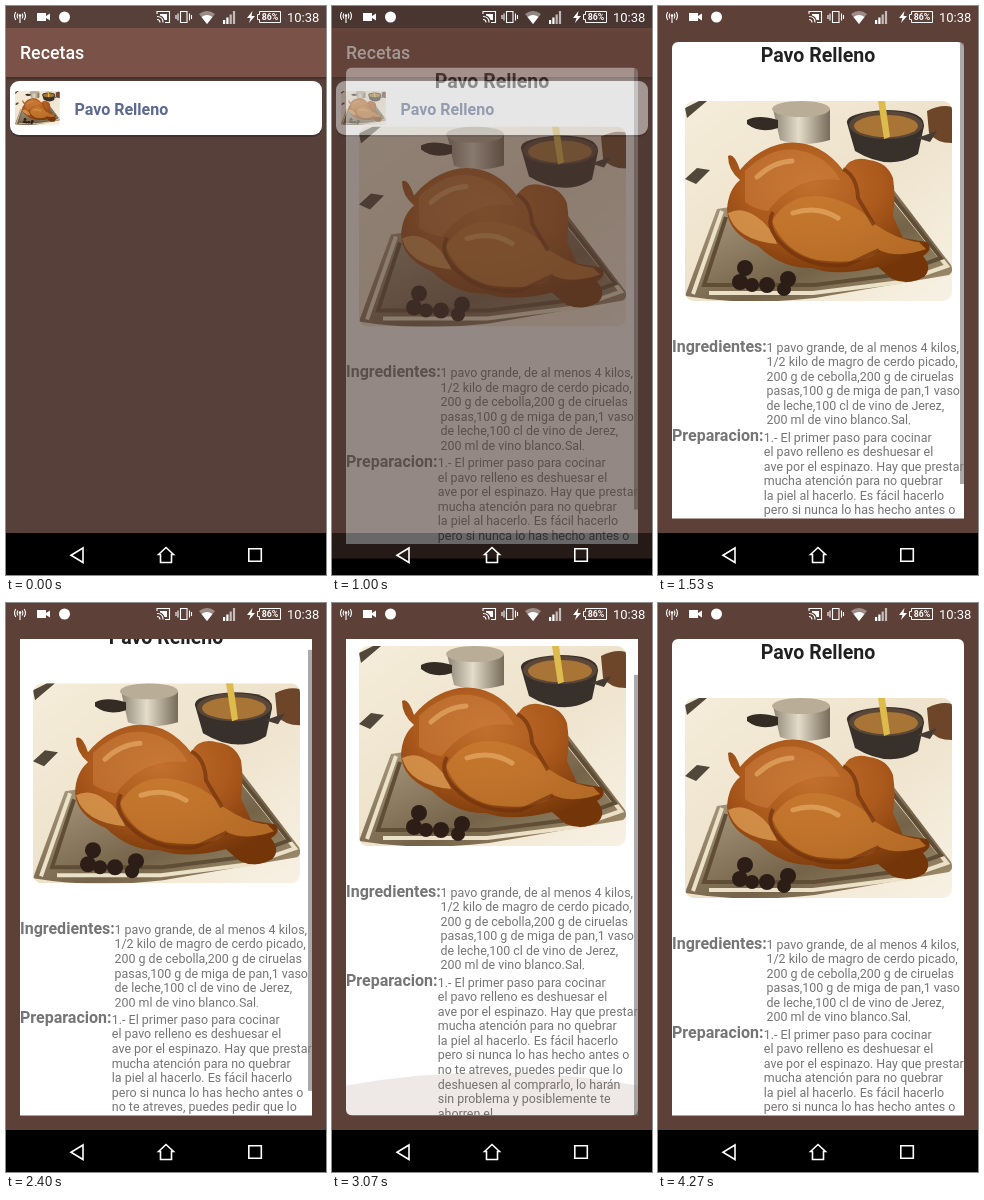
Animation, 320 px wide and 569 px high, one loop 4390 ms. Source, as an HTML page:

```html
<!DOCTYPE html>
<html lang="es">
<head>
<meta charset="utf-8">
<title>Recetas</title>
<style>
html, body { margin: 0; width: 100%; height: 100%; overflow: hidden; background: #000; }
svg { display: block; font-family: Roboto, sans-serif; }
#stage { width: 100vw; height: 100vh; }
.bold { font-weight: 700; font-size: 16px; }
.body { font-size: 12.44px; }
.line { fill: none; stroke: #fff; stroke-width: 1.6; }
</style>
</head>
<body>
<svg id="stage" viewBox="0 0 320 569">
  <defs>
    <linearGradient id="table" x2="1" y2="1">
      <stop offset="0" stop-color="#f5edda"/><stop offset=".5" stop-color="#eee2cb"/><stop offset="1" stop-color="#f8f1e4"/>
    </linearGradient>
    <linearGradient id="steel" x2="1">
      <stop offset="0" stop-color="#8f8676"/><stop offset=".45" stop-color="#e4dcc9"/><stop offset="1" stop-color="#776b59"/>
    </linearGradient>
    <linearGradient id="tray" x2="1" y2="1">
      <stop offset="0" stop-color="#b5a68c"/><stop offset=".6" stop-color="#756349"/><stop offset="1" stop-color="#a89675"/>
    </linearGradient>
    <radialGradient id="roast" cx=".42" cy=".3" r=".7">
      <stop offset="0" stop-color="#c2702c"/><stop offset=".5" stop-color="#ab591c"/><stop offset="1" stop-color="#743609"/>
    </radialGradient>
    <linearGradient id="shade" x2="0" y2="1">
      <stop offset="0" stop-opacity=".3"/><stop offset="1" stop-opacity="0"/>
    </linearGradient>
    <clipPath id="ingredientBox"><rect x="100" y="330" width="210" height="88.5"/></clipPath>
    <clipPath id="photoShape"><rect width="267" height="200" rx="9"/></clipPath>

    <g id="photo" clip-path="url(#photoShape)">
      <rect width="267" height="200" fill="url(#table)"/>
      <path d="M0 7l14-7h8L2 17zM0 78l12-11 13 2-14 14z" fill="#51483b"/>
      <path d="M88 8h57v31q-28 8-50 0z" fill="url(#steel)"/>
      <ellipse cx="116" cy="8" rx="29" ry="8" fill="#b9ad98"/>
      <path d="M62 19q11-6 31 0v8q-18 6-31-4z" fill="#352b25"/>
      <path d="M162 22q-2-10 38-13 40 0 39 16l-6 28q-28 18-63-3z" fill="#38302a"/>
      <ellipse cx="201" cy="24" rx="37" ry="14" fill="#5a4738"/>
      <ellipse cx="201" cy="25" rx="32" ry="11" fill="#a87536"/>
      <path d="M193 0h7l5 36-6 2z" fill="#ddbb4d"/>
      <path d="M242 10q14-7 25-4v36q-16 0-23-10z" fill="#6d4528"/>
      <path d="M232 37l20-7-7 11z" fill="#463c35"/>
      <path d="M32 108L0 195q60 10 130 2l134-23q5-3 2-10L208 88l-14-5z" fill="url(#tray)"/>
      <path d="M37 110L8 193M200 87l62 78-46 16-88 11H24" fill="none" stroke="#ebe1c9" stroke-width="4"/>
      <path d="M41 116l-22 68h110l80-10 47-17-51-65" fill="none" stroke="#5f4d36" stroke-width="4"/>
      <path d="M43 55q6-4 12 14 18-22 45-27 34-4 58 27 8-15 26-10 18 2 24 18 3 20 0 38l10 22 24 4q7 7-4 14 10 12 1 21-16 9-32 2l-14-12q-42 10-66 1-30 1-54-22-30-13-31-36 1-20 13-30-12-10-12-24z" fill="url(#roast)"/>
      <path d="M60 70q28-27 57-20 26 6 38 29-44-6-72 31-12-1-23-9z" fill="#cf8240" opacity=".5"/>
      <path d="M87 120q18-30 54-24 31 6 50 28 24 16 43 17l7 7q-28 10-47 1-13 16-62 10-33-8-45-39z" fill="#c97c31" opacity=".75"/>
      <path d="M43 112q14-7 29 4 15 10 20 27-42-4-49-31z" fill="#dc9c52" opacity=".8"/>
      <path d="M158 68q14 7 15 29l16 27M88 111q-8 14 7 30 25 27 67 23l32-15" fill="none" stroke="#6e300b" stroke-width="4" opacity=".65"/>
      <path d="M108 112q24-8 45 5M72 76q16-15 35-16" fill="none" stroke="#efbb76" stroke-width="5" stroke-linecap="round" opacity=".55"/>
      <g fill="#2c1e17">
        <circle cx="60" cy="167" r="8"/><circle cx="55" cy="181" r="8"/><circle cx="67" cy="184" r="7"/>
        <circle cx="82" cy="184" r="8"/><circle cx="103" cy="178" r="8"/><circle cx="99" cy="188" r="7"/>
      </g>
    </g>
  </defs>

  <rect width="320" height="569"/>
  <g id="list">
    <rect width="320" height="527" fill="#58403a"/>
    <rect y="22" width="320" height="49" fill="#7a5247"/>
    <rect y="71" width="320" height="4" fill="url(#shade)"/>
    <text x="14" y="53" font-size="17.78" font-weight="500" fill="#fff">Recetas</text>
    <rect x="4" y="77" width="312" height="54" rx="9" opacity=".25"/>
    <rect x="4" y="75" width="312" height="54" rx="9" fill="#fff"/>
    <use href="#photo" transform="translate(9 85) scale(.168 .17)"/>
    <text x="68.5" y="108.5" class="bold" fill="#5c698f">Pavo Relleno</text>
    <rect id="dim" width="320" height="569"/>
  </g>

  <g id="detail">
    <rect width="320" height="527" fill="#5d4038"/>
    <svg x="14" y="36" width="292" height="476.5" viewBox="14 36 292 476.5">
      <g id="content">
        <rect x="14" y="36" width="292" height="528.5" rx="6" fill="#fff"/>
        <text x="160" y="56" text-anchor="middle" font-size="19.56" font-weight="700" fill="#212121">Pavo Relleno</text>
        <use href="#photo" x="27" y="95"/>
        <g fill="#757575">
          <text x="14" y="345.5" class="bold">Ingredientes:</text>
          <g id="ingredients" class="body" clip-path="url(#ingredientBox)"></g>
          <text x="14" y="435" class="bold">Preparacion:</text>
          <g id="steps" class="body"></g>
        </g>
      </g>
      <path id="bottomGlow" d="M14 0V-30Q160-56 306-30V0z" fill="#795548"/>
      <path id="topGlow" d="M14 0V-30Q160-56 306-30V0z" fill="#6b625e"/>
      <rect id="thumb" x="302" y="37" width="4" height="441" fill="#7d7d7d"/>
    </svg>
  </g>

  <g fill="#fff">
    <g class="line" style="stroke-width:1.1">
      <path d="M14 10v7M11.8 7.5q-1.5 2.5 0 5M16.2 7.5q1.500 2.500 0 5M9.800 6q-2.500 4 0 8M18.200 6q2.500 4 0 8"/>
      <path d="M151 8V5.500h12.500v11H159M151 10.500q6 0 6 6M151 13.500q3 0 3 3"/>
      <path d="M174.500 5.500h6.500v11h-6.500zM172 7.500v7M183.500 7.500v7M170 9v4M185.500 9v4"/>
    </g>
    <circle cx="14" cy="9.500" r="1.300"/>
    <path d="M31 7h9v3l4-2.500v7L40 12v3h-9z"/>
    <circle cx="58.500" cy="11" r="5.500"/>
    <path d="M154 8h7v6h-2.500q-1-4-4.500-4.500z"/>
    <path d="M193 8q8-6 16 0l-8 10z" opacity=".4"/>
    <path d="M195.500 11q5.500-4 11 0L201 18z"/>
    <path d="M217 14h2.200v4H217zM220.300 11.500h2.200V18h-2.200z"/>
    <path d="M223.600 8.500h2.200V18h-2.200zM226.900 5h2.200v13h-2.200z" opacity=".65"/>
    <path d="M246.500 5l-5.500 7h3.500l-1.500 5 6-7h-3.500z"/>
    <path d="M253.500 5.500h21v11h-21v-3h-2v-5h2z" class="line" style="stroke-width:1"/>
    <text x="264" y="14.300" text-anchor="middle" font-size="8.800" font-weight="700">86%</text>
    <text x="281" y="15.800" font-size="13">10:38</text>
    <path class="line" d="M77 542v14.500L65 549.200zM152.500 548.500l7.500-7 7.500 7h-2v8h-11v-8zM242.800 542.800h12.500v12.500h-12.500z"/>
  </g>
</svg>
<script>
const LOOP = 4390, MAX_SCROLL = 52, LINE = 14.58;
const el = id => document.getElementById(id);
const ramp = (t, a, b) => Math.min(1, Math.max(0, (t - a) / (b - a)));
const smooth = p => p * p * (3 - 2 * p);
const easeOut = (p, power) => 1 - (1 - p) ** power;

function addLines(id, x, y, lines) {
  el(id).innerHTML = lines.map((s, i) => `<text x="${x}" y="${y + i * LINE}">${s}</text>`).join('');
}
addLines('ingredients', 108.5, 345.5, [
  '1 pavo grande, de al menos 4 kilos,', '1/2 kilo de magro de cerdo picado,',
  '200 g de cebolla,200 g de ciruelas', 'pasas,100 g de miga de pan,1 vaso',
  'de leche,100 cl de vino de Jerez,', '200 ml de vino blanco.Sal,'
]);
addLines('steps', 105.8, 435.5, [
  '1.- El primer paso para cocinar', 'el pavo relleno es deshuesar el',
  'ave por el espinazo. Hay que prestar', 'mucha atención para no quebrar',
  'la piel al hacerlo. Es fácil hacerlo', 'pero si nunca lo has hecho antes o',
  'no te atreves, puedes pedir que lo', 'deshuesen al comprarlo, lo harán',
  'sin problema y posiblemente te', 'ahorren el'
]);

function setGlow(id, y, direction, amount) {
  el(id).setAttribute('transform', `translate(0 ${y}) scale(1 ${direction * amount})`);
  el(id).setAttribute('opacity', 0.13 * amount);
}

function draw(t) {
  const slide = 45 * (1 - ramp(t, 930, 1280)) ** 2.5;
  el('detail').setAttribute('transform', `translate(0 ${slide})`);
  el('detail').setAttribute('opacity', easeOut(ramp(t, 930, 1130), 1.2));
  el('dim').setAttribute('opacity', 0.3 * easeOut(ramp(t, 930, 1147), 2));

  const scroll = MAX_SCROLL * (easeOut(ramp(t, 2370, 2600), 2.3) - smooth(ramp(t, 3110, 3330)));
  el('content').setAttribute('transform', `translate(0 ${-scroll})`);
  el('thumb').setAttribute('y', 37 + scroll * 0.67);
  el('thumb').setAttribute('opacity', 0.65 * (1 - ramp(t, 3980, 4260)));

  setGlow('bottomGlow', 512.5, 1, smooth(ramp(t, 2580, 2900)) * (1 - ramp(t, 3080, 3300)));
  setGlow('topGlow', 36, -1, 0.93 * smooth(ramp(t, 3290, 3400)) * (1 - smooth(ramp(t, 3430, 3920))));
}

const start = performance.now();
(function tick() {
  draw((performance.now() - start) % LOOP);
  requestAnimationFrame(tick);
})();
</script>
</body>
</html>
```
